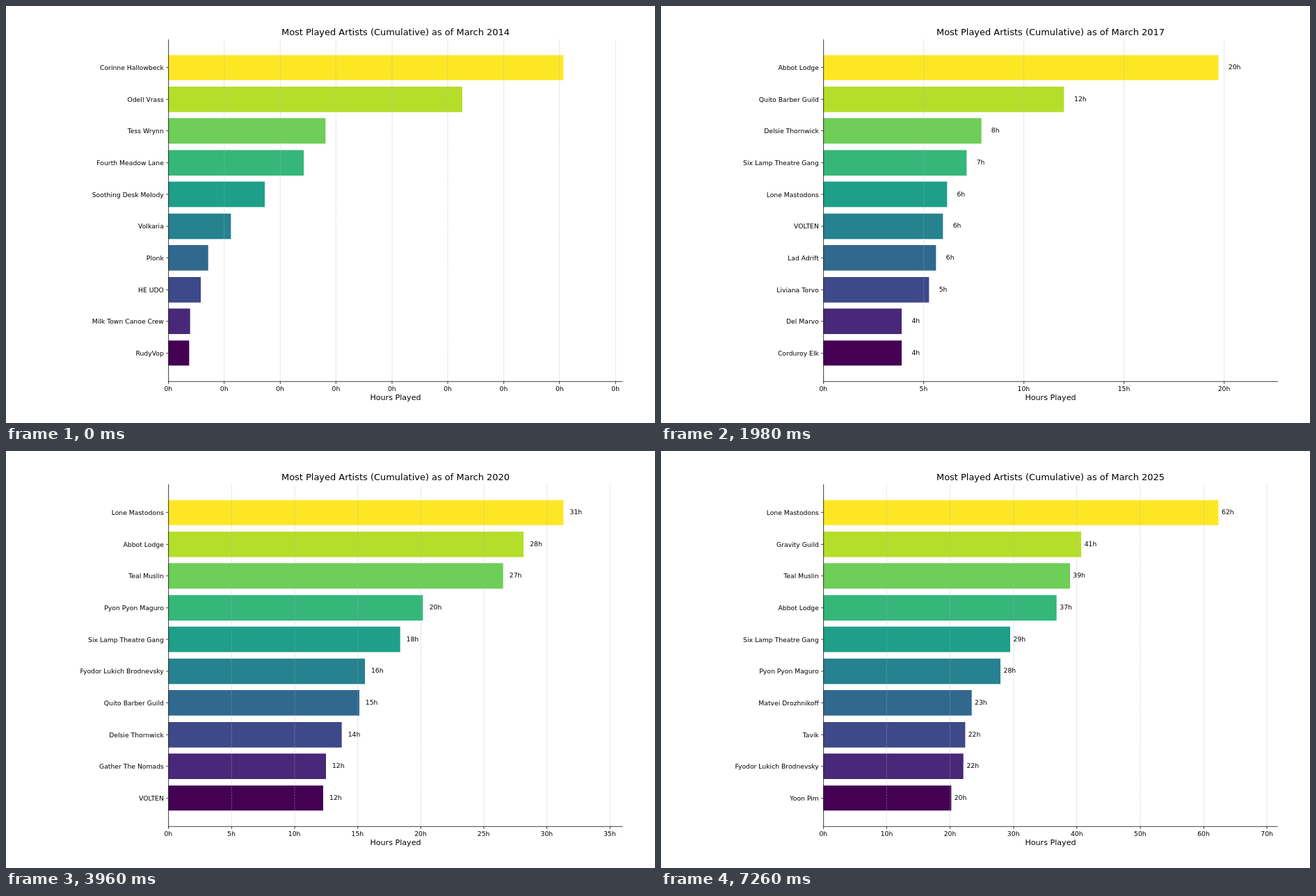
Animation of 933 by 600 pixels, one loop 7.92 s. Source, as an HTML page:

```html
<!DOCTYPE html>
<html lang="en">
<head>
<meta charset="utf-8">
<title>Most Played Artists</title>
<style>
html, body { margin: 0; width: 100%; height: 100%; overflow: hidden; background: #fff; }
svg { display: block; }
text { font: 9.26px "DejaVu Sans", sans-serif; }
.title { font-size: 12.96px; }
.axis { font-size: 11.11px; }
.mid { text-anchor: middle; }
.end { text-anchor: end; }
line { stroke: #000; stroke-width: .74; }
.grid { stroke: #b0b0b0; stroke-opacity: .6; stroke-dasharray: 2.74 1.19; }
</style>
</head>
<body>
<svg id="chart" width="933" height="600"></svg>
<script>
const HOLD = 660, FIRST_YEAR = 2014;
const LEFT = 233.33, RIGHT = 886.67, TOP = 48, BOTTOM = 540;
const ROW = 45.64, BAR = 36.51, FIRST_BAR = 88.62;
const COLORS = ['#fde725', '#b5de2b', '#6ece58', '#35b779', '#1f9e89',
  '#26828e', '#31688e', '#3e4989', '#482878', '#440154'];

// One entry per year: artists by rank, then their hours.
const YEARS = [
  ['Corinne Hallowbeck|Odell Vrass|Tess Wrynn|Fourth Meadow Lane|Soothing Desk Melody|Volkaria|Plonk|HE UDO|Milk Town Canoe Crew|RudyVop',
    [.3535, .263, .1407, .121, .0863, .0562, .0356, .029, .0197, .0185]],
  ['Abbot Lodge|Quito Barber Guild|Liviana Torvo|Corduroy Elk|ZUV|Lad Adrift|The Pelmets|Wyn Cobbler|Tidy Smuggler|Tibby Zinnia',
    [6.172, 5.787, 3.658, 1.887, 1.615, 1.295, .985, .985, .96, .96]],
  ['Abbot Lodge|Quito Barber Guild|Delsie Thornwick|Liviana Torvo|Lad Adrift|Corduroy Elk|VOLTEN|Lone Mastodons|ZUV|Del Marvo',
    [13.04, 9.1, 4.9, 4.5, 3.5, 3.1, 2.9, 2.6, 2.3, 2.1]],
  ['Abbot Lodge|Quito Barber Guild|Delsie Thornwick|Six Lamp Theatre Gang|Lone Mastodons|VOLTEN|Lad Adrift|Liviana Torvo|Del Marvo|Corduroy Elk',
    [19.72, 12.02, 7.88, 7.15, 6.17, 5.97, 5.625, 5.275, 3.91, 3.91]],
  ['Abbot Lodge|Fyodor Lukich Brodnevsky|Quito Barber Guild|Lone Mastodons|Six Lamp Theatre Gang|VOLTEN|Delsie Thornwick|Del Marvo|Nilza Carvalhães|Wyverns',
    [21.98, 13.79, 13.15, 12.03, 10.13, 8.7, 8.375, 8.05, 6.87, 6.05]],
  ['Abbot Lodge|Lone Mastodons|Fyodor Lukich Brodnevsky|Six Lamp Theatre Gang|Quito Barber Guild|Teal Muslin|Delsie Thornwick|VOLTEN|Pyon Pyon Maguro|Del Marvo',
    [25.1, 21.5, 14.7, 14.3, 14.2, 13.4, 11.1, 10.5, 10.2, 9.4]],
  ['Lone Mastodons|Abbot Lodge|Teal Muslin|Pyon Pyon Maguro|Six Lamp Theatre Gang|Fyodor Lukich Brodnevsky|Quito Barber Guild|Delsie Thornwick|Gather The Nomads|VOLTEN',
    [31.33, 28.17, 26.55, 20.2, 18.37, 15.58, 15.13, 13.75, 12.49, 12.28]],
  ['Lone Mastodons|Abbot Lodge|Teal Muslin|Pyon Pyon Maguro|Six Lamp Theatre Gang|Fyodor Lukich Brodnevsky|Quito Barber Guild|Tavik|Delsie Thornwick|Gather The Nomads',
    [36.54, 31.7, 30.3, 22.1, 21.5, 17.9, 16.5, 15.6, 14.6, 13.6]],
  ['Lone Mastodons|Abbot Lodge|Teal Muslin|Six Lamp Theatre Gang|Pyon Pyon Maguro|Fyodor Lukich Brodnevsky|Tavik|Quito Barber Guild|K_ Dorn|momopidoolee',
    [42.33, 35.2, 34.02, 24.54, 23.9, 20.19, 19.61, 17.84, 16.1, 15.14]],
  ['Lone Mastodons|Abbot Lodge|Teal Muslin|Six Lamp Theatre Gang|Pyon Pyon Maguro|Gravity Guild|Fyodor Lukich Brodnevsky|Tavik|Quito Barber Guild|K_ Dorn',
    [45.4, 35.8, 35.6, 26.2, 25.3, 24.1, 20.9, 20.6, 18.2, 17.2]],
  ['Lone Mastodons|Teal Muslin|Abbot Lodge|Gravity Guild|Six Lamp Theatre Gang|Pyon Pyon Maguro|Tavik|Fyodor Lukich Brodnevsky|Matvei Drozhnikoff|momopidoolee',
    [55, 37.3, 36.3, 32.5, 27.9, 26.7, 21.5, 21.4, 20.3, 18.6]],
  ['Lone Mastodons|Gravity Guild|Teal Muslin|Abbot Lodge|Six Lamp Theatre Gang|Pyon Pyon Maguro|Matvei Drozhnikoff|Tavik|Fyodor Lukich Brodnevsky|Yoon Pim',
    [62.35, 40.7, 38.9, 36.81, 29.49, 27.95, 23.4, 22.36, 22.12, 20.17]]
];

const chart = document.getElementById('chart');
const text = (x, y, str, cls = '') => `<text x="${x}" y="${y}" class="${cls}">${str}</text>`;
const line = (x1, y1, x2, y2, cls = '') =>
  `<line x1="${x1}" y1="${y1}" x2="${x2}" y2="${y2}" class="${cls}"/>`;
// Edges and line centres sit on a grid of 2/3 px.
const edge = v => Math.round(v * 1.5) / 1.5;
const centre = v => (Math.floor(v * 1.5 + .01) + .5) / 1.5;

function draw(index) {
  const [names, hours] = YEARS[index];
  const limit = hours[0] * 1.15;
  const scale = (RIGHT - LEFT) / limit;
  const step = [.05, 1, 2, 2.5, 5, 10].find(s => limit / s <= 9);
  let bars = '', grid = '', labels = '';

  names.split('|').forEach((name, i) => {
    const y = FIRST_BAR + i * ROW, end = LEFT + hours[i] * scale;
    const top = edge(y - BAR / 2), left = edge(LEFT);
    bars += `<rect x="${left}" y="${top}" width="${edge(end) - left}"
      height="${edge(y + BAR / 2) - top}" fill="${COLORS[i]}"/>`;
    labels += line(LEFT - 3.24, centre(y), LEFT, centre(y)) +
      text(226.85, y + 3.5, name, 'end') +
      text(end + scale / 2, y + 2.5, Math.round(hours[i]) + 'h');
  });

  for (let v = 0; v <= limit; v += step) {
    const x = LEFT + v * scale, cx = centre(x);
    grid += line(cx, BOTTOM, cx, TOP, 'grid');
    labels += line(cx, BOTTOM, cx, BOTTOM + 3.9) + text(x, 553.5, Math.round(v) + 'h', 'mid');
  }

  const mid = (LEFT + RIGHT) / 2;
  chart.innerHTML = bars + grid + labels +
    line(centre(LEFT), TOP, centre(LEFT), BOTTOM + .67) +
    line(LEFT, centre(BOTTOM), RIGHT, centre(BOTTOM)) +
    text(mid, 42.4, `Most Played Artists (Cumulative) as of March ${FIRST_YEAR + index}`, 'title mid') +
    text(mid, 567.3, 'Hours Played', 'axis mid');
}

let shown = -1;
function tick() {
  const index = Math.floor(performance.now() / HOLD) % YEARS.length;
  if (index !== shown) draw(shown = index);
  requestAnimationFrame(tick);
}
tick();
</script>
</body>
</html>
```
